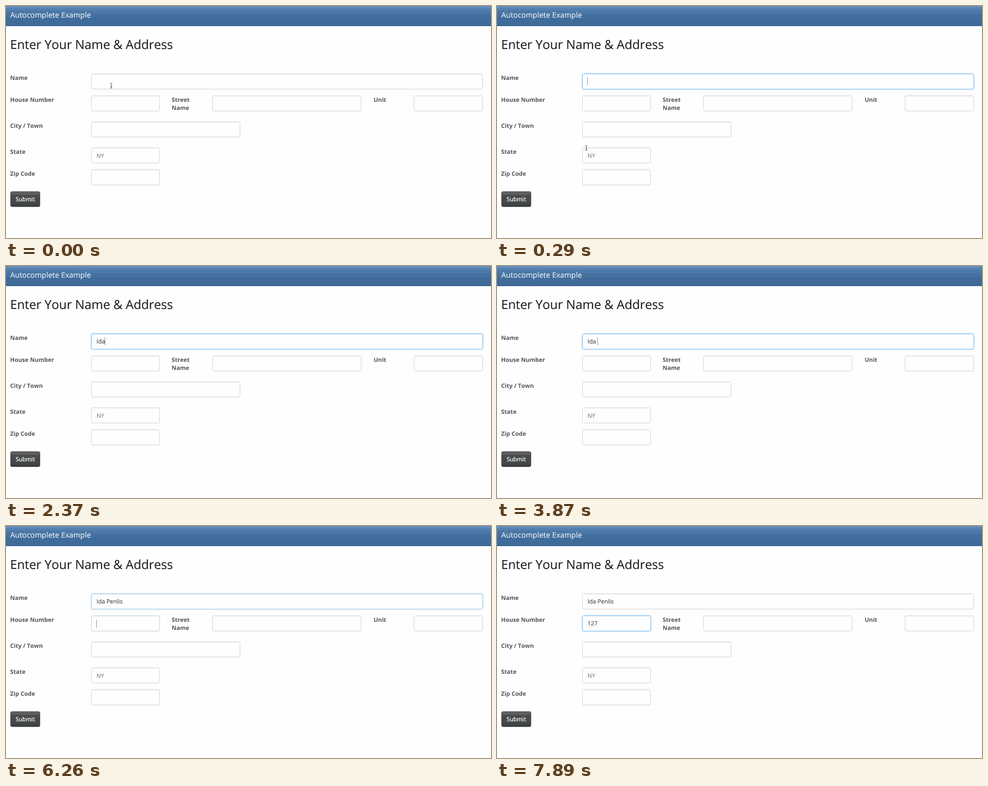
An HTML page for the animation above (8000 ms loop, 1081x518 px).

```html
<!DOCTYPE html>
<html lang="en">
<head>
<meta charset="utf-8">
<title>Autocomplete Example</title>
<style>
  html, body { margin: 0; width: 100%; height: 100%; overflow: hidden; background: #fefefe; }
  svg { display: block; width: 1081px; height: 518px; }
  text {
    font: 13.02px "Open Sans", sans-serif; font-kerning: none; white-space: pre;
    text-rendering: geometricPrecision; fill: #4c4c4c; stroke: #4c4c4c; stroke-width: .2px;
  }
  .label { font-weight: 700; fill: #555; stroke: none; }
  .bar { font-size: 16.65px; fill: #eaeff5; stroke: #eaeff5; }
  .heading { font-size: 27.85px; fill: #222; stroke: #222; }
  .hint { fill: #808080; stroke: #808080; }
  .submit { fill: #fff; stroke: #fff; stroke-width: .3px; }
</style>
</head>
<body>
<svg id="stage" viewBox="0 0 1081 518">
  <defs>
    <linearGradient id="buttonFill" x2="0" y2="1">
      <stop offset="0" stop-color="#626363"/>
      <stop offset=".2" stop-color="#5b5c5c"/>
      <stop offset=".24" stop-color="#4b4d4d"/>
      <stop offset=".85" stop-color="#434646"/>
      <stop offset="1" stop-color="#353737"/>
    </linearGradient>
  </defs>
  <rect width="1081" height="518" fill="#fefefe"/>
</svg>
<script>
const LOOP = 8000;
const TICK = 149.1;
const LEAD = 17;
const BLINK = 500;
const FADE = 170;
const TEXT_X = 201.8;
const GRAY = [204, 204, 204];
const BLUE = [112, 183, 240];
const stage = document.getElementById('stage');

const lerp = (a, b, p) => a + (b - a) * p;
const easeOut = p => 1 - (1 - p) ** 2;
const clamp = p => Math.min(1, Math.max(0, p));
const mix = (a, b, p) => `rgb(${a.map((c, i) => Math.round(lerp(c, b[i], p)))})`;

function set(el, attrs) {
  for (const key in attrs) el.setAttribute(key, attrs[key]);
}

function add(tag, attrs) {
  const el = document.createElementNS('http://www.w3.org/2000/svg', tag);
  set(el, attrs);
  return stage.appendChild(el);
}

function label(content, x, y, style = 'label') {
  const el = add('text', { x, y, class: style });
  el.textContent = content;
  return el;
}

function drawBar() {
  const bands = 6, height = 44.5;
  for (let i = 0; i < bands; i++) {
    const y = Math.round(44 * (i / bands) ** 1.4);
    const fill = mix([97, 142, 188], [62, 107, 154], easeOut(i / (bands - 1)));
    add('rect', { y, width: 1081, height: height - y, fill });
  }
  add('rect', { y: 43, width: 1081, height: 1, fill: '#3a618b' });
}

// Draws an input box and returns a function that sets its focus from 0 to 1.
function field(x, y, right) {
  const box = (grow, attrs) => add('rect', {
    x: x - grow, y: y - grow, width: right - x + 2 * grow, height: 34 + 2 * grow,
    rx: 3.3 + grow, fill: 'none', ...attrs
  });
  const glow = [1, 2, 3].map(grow => box(grow, { stroke: mix(BLUE, BLUE, 0) }));
  add('path', { d: `M${x + 2} ${y + 1}H${right - 2}`, stroke: '#000', 'stroke-opacity': .04 });
  const border = box(0);
  const setFocus = focus => {
    glow.forEach((el, i) => set(el, { 'stroke-opacity': .3 * focus ** 2 / (i + 1) ** 1.3 }));
    set(border, { stroke: mix(GRAY, BLUE, focus) });
  };
  setFocus(0);
  return setFocus;
}

drawBar();
label('Autocomplete Example', 9.5, 26.3, 'bar');
label('Enter Your Name & Address', 9.3, 96, 'heading');
label('Name', 9.3, 165.2);
label('House Number', 9.3, 214);
label('Street', 369.3, 214);
label('Name', 369.3, 232.4);
label('Unit', 819.5, 214);
label('City / Town', 9.3, 272);
label('State', 9.3, 329.8);
label('Zip Code', 9.3, 379.2);

// Typing times in ms, one per letter
const inputs = [
  {
    text: 'Ida Penlis', start: 30, end: 6240, caretY: 159,
    keys: [2080, 2290, 2370, 3800, 4700, 5000, 5100, 5180, 5430, 5510],
    setFocus: field(190.5, 151.5, 1062.5), value: label('', TEXT_X, 173.2, 'value')
  },
  {
    text: '127', start: 6240, end: Infinity, caretY: 209,
    keys: [6960, 7260, 7380],
    setFocus: field(190.5, 200.5, 342.5), value: label('', TEXT_X, 222.3, 'value')
  }
];
field(460.5, 200.5, 791.5);
field(909.5, 200.5, 1062.5);
field(190.5, 258.5, 521.5);
field(190.5, 316.5, 342.5);
field(190.5, 365.5, 342.5);
label('NY', TEXT_X, 338.7, 'hint');

add('rect', { x: 10.2, y: 414.4, width: 65.4, height: 33.6, rx: 3.3, fill: 'url(#buttonFill)', stroke: '#363838' });
label('Submit', 21.4, 436.2, 'submit');

const caret = add('rect', { width: 1, height: 18, fill: '#808080' });
const pointer = add('path', {
  d: 'M-2.5 -5.5H-1L0 -4.5L1 -5.5H2.5M0 -4.5V4.5M-2.5 5.5H-1L0 4.5L1 5.5H2.5M-1.5 2.5H1.5',
  fill: 'none', stroke: '#333'
});

function drawCaret(input, typed, t) {
  const last = typed ? input.keys[typed - 1] : input.start;
  const width = typed ? input.value.getComputedTextLength() : 0;
  const shown = t >= input.start && Math.floor((t - last) / BLINK) % 2 === 0;
  set(caret, { x: Math.floor(TEXT_X + width), y: input.caretY, opacity: shown ? 1 : 0 });
}

function drawPointer(t) {
  const p = clamp((t - TICK) / TICK);
  set(pointer, {
    transform: `translate(${lerp(234.5, 199, p)} ${lerp(178, 317, p)})`,
    opacity: t < 2.5 * TICK ? 1 : 0
  });
}

function render(time) {
  const t = Math.floor((time + LEAD) / TICK) * TICK;
  for (const input of inputs) {
    const typed = input.keys.filter(key => key <= t).length;
    const fade = from => easeOut(clamp((t - from) / FADE));
    input.value.textContent = input.text.slice(0, typed);
    input.setFocus(fade(input.start) - fade(input.end));
    if (t < input.end && (t >= input.start || input === inputs[0])) drawCaret(input, typed, t);
  }
  drawPointer(t);
}

const begin = performance.now();
function frame() {
  render((performance.now() - begin) % LOOP);
  requestAnimationFrame(frame);
}
frame();
</script>
</body>
</html>
```
